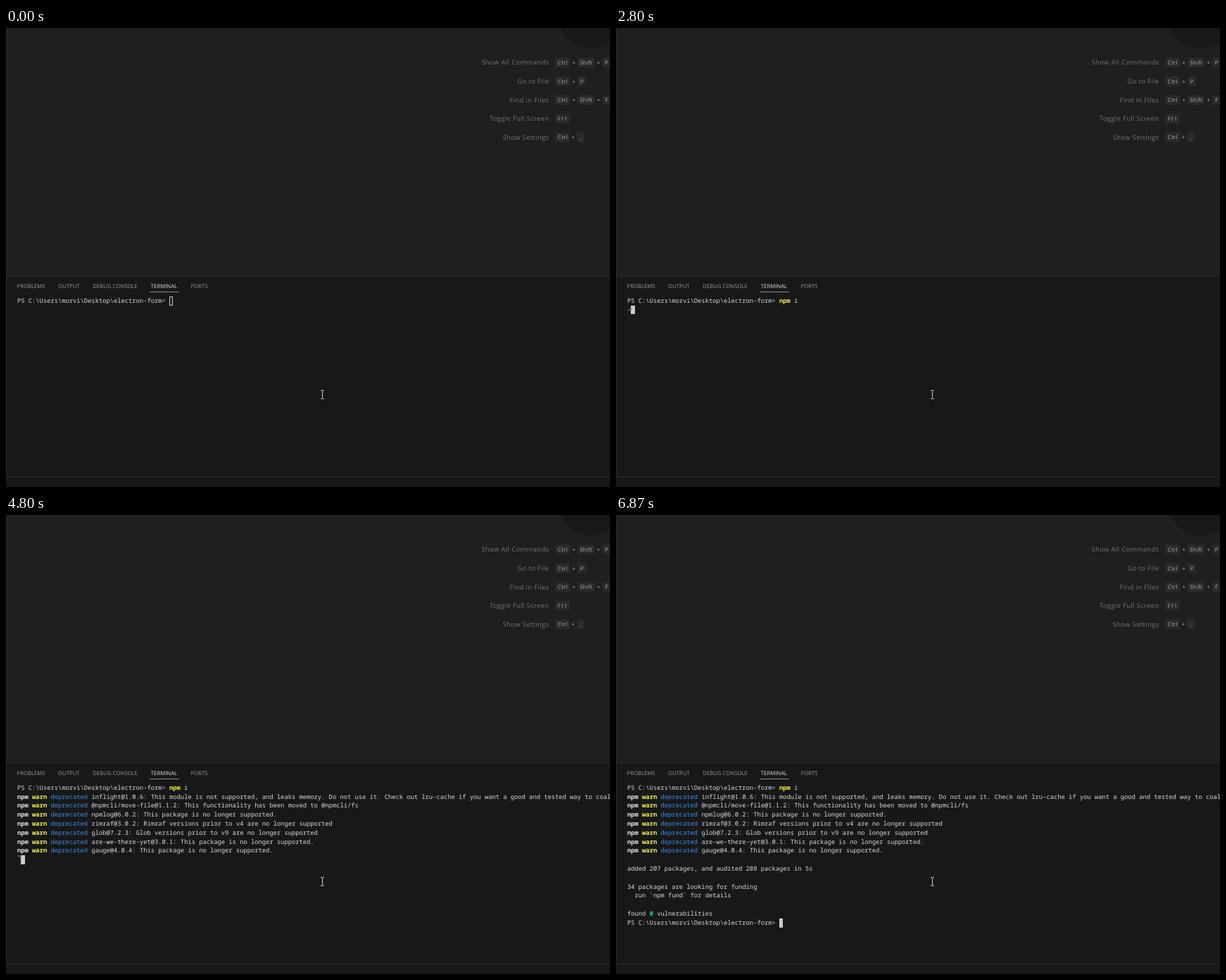
An HTML page for the animation above (8 s loop, 858 px wide and 653 px high).

```html
<!DOCTYPE html>
<html lang="en">
<head>
<meta charset="utf-8">
<title>Terminal install</title>
<style>
  html, body { margin: 0; width: 100%; height: 100%; overflow: hidden; background: #181818; }
  #stage { position: relative; width: 858px; height: 653px; overflow: hidden; text-rendering: geometricPrecision; }
  #chrome { position: absolute; inset: 0; font-family: "Open Sans", "Noto Sans", sans-serif; }
  .label { font-size: 9.4px; letter-spacing: .04em; fill: #737373; text-anchor: end; }
  .key { font-size: 7.8px; letter-spacing: .04em; fill: #b4b4b4; text-anchor: middle; }
  .tab { font-size: 7.75px; fill: #9d9d9d; }
  .tab.active { fill: #e4e0d8; }
  #term {
    --cw: 5.274px; --lh: 12.8px;
    position: absolute; left: 16px; top: 381.8px;
    font: 8.79px/12.8px "Noto Sans Mono", "DejaVu Sans Mono", monospace;
    color: #dadada; white-space: pre;
  }
  .row { position: absolute; left: 0; height: var(--lh); }
  b { color: #e5e5e5; }
  .warn { color: #f5f543; }
  .note { color: #3b8eea; }
  .ok { color: #23d18b; }
  #cursor, #spinner { position: absolute; height: var(--lh); font: 9.6px/12.8px "DejaVu Sans", sans-serif; }
  #cursor {
    width: var(--cw); box-sizing: border-box; overflow: hidden;
    background: #ccc; color: #181818; text-indent: calc(-1 * var(--cw));
  }
  #cursor.idle { background: none; border: 1px solid #ccc; }
</style>
</head>
<body>
<div id="stage">
  <svg id="chrome" width="858" height="653" viewBox="0 0 858 653">
    <rect width="858" height="353" fill="#1f1f1f"/>
    <circle cx="830" cy="-16" r="45" fill="#181818"/>
    <path d="M0 353.5H858M0 638.5H858M.5 0V638" stroke="#2b2b2b"/>
    <g id="hints"></g>
    <g id="tabs"></g>
    <path d="M204 375.5H246" stroke="#8c8a86"/>
    <path d="M447 515.5H449M450 515.5H452M447 527.5H449M450 527.5H452M449.5 516V527" stroke="#d0d0d0"/>
  </svg>
  <div id="term"></div>
</div>
<script>
const $ = id => document.getElementById(id);

// Shortcut hints: label, then keys as [text, left, width]
const ctrl = ['Ctrl', 780, 21], shift = ['Shift', 812, 24];
const hints = [
  ['Show All Commands', ctrl, shift, ['P', 847, 12]],
  ['Go to File', ctrl, ['P', 812, 12]],
  ['Find in Files', ctrl, shift, ['F', 847, 12]],
  ['Toggle Full Screen', ['F11', 780, 21]],
  ['Show Settings', ctrl, [',', 811, 11]]
];
$('hints').innerHTML = hints.map(([label, ...keys], i) => {
  const y = 49 + i * 26.6;
  const caps = keys.map(([text, x, w], k) =>
    `<rect x="${x}" y="${y - 7}" width="${w}" height="14" rx="2" fill="#2a2a2a"/>` +
    `<text class="key" x="${x + w / 2 + .2}" y="${y + 2.9}">${text}</text>` +
    (k ? `<text class="key" x="${x - 5.2}" y="${y + 2.9}">+</text>` : ''));
  return `<text class="label" x="771.4" y="${y + 3.4}">${label}</text>` + caps.join('');
}).join('');

const tabs = [['PROBLEMS', 15.5], ['OUTPUT', 74], ['DEBUG CONSOLE', 123.3], ['TERMINAL', 205.8], ['PORTS', 262.5]];
$('tabs').innerHTML = tabs.map(([name, x]) =>
  `<text class="tab${name === 'TERMINAL' ? ' active' : ''}" x="${x}" y="370.4">${name}</text>`).join('');

// Terminal contents
const prompt = 'PS C:\\Users\\morvi\\Desktop\\electron-form&gt; ';
const gone = 'This package is no longer supported.';
const warnings = [
  'inflight@1.0.6: This module is not supported, and leaks memory. Do not use it. Check out lru-cache if you want a good and tested way to coalesce',
  '@npmcli/move-file@1.1.2: This functionality has been moved to @npmcli/fs',
  'npmlog@6.0.2: ' + gone,
  'rimraf@3.0.2: Rimraf versions prior to v4 are no longer supported',
  'glob@7.2.3: Glob versions prior to v9 are no longer supported',
  'are-we-there-yet@3.0.1: ' + gone,
  'gauge@4.0.4: ' + gone
].map(text => `<b>npm</b> <b class="warn">warn</b> <span class="note">deprecated</span> ${text}`);
const summary = [
  '',
  'added 207 packages, and audited 208 packages in 5s',
  '',
  '34 packages are looking for funding',
  '  run `npm fund` for details',
  '',
  'found <b class="ok">0</b> vulnerabilities',
  prompt
];
const lines = [prompt + '<b class="warn" id="cmd"></b><span id="arg"></span>', ...warnings, ...summary];
$('term').innerHTML = lines.map((html, i) =>
  `<div class="row" style="top:${(i * 12.8).toFixed(1)}px">${html}</div>`).join('') +
  '<div id="spinner"></div><div id="cursor"></div>';
const rows = document.querySelectorAll('.row');

// The screen advances 15 times a second; all times below are in ticks.
const LOOP = 8000, TICK = 1000 / 15;
const keyTicks = [11, 15, 19, 21, 23];
const ENTER = 27, SPIN = 35, WARN = 44, LAST_WARN = 45, DONE = 103;
const dots = '⠋⠙⠹⠸⠼⠴⠦⠧⠇⠏';

function spinStep(n) {
  if (n < 42) return Math.floor(n / 2) - 16;
  if (n < 48) return n - 37;
  return 11 + Math.floor((n - 48) * 5 / 6);
}

function place(el, row, col) {
  el.style.top = `calc(${row} * var(--lh))`;
  el.style.left = `calc(${col} * var(--cw))`;
}

function render(n) {
  const typed = keyTicks.filter(k => n >= k).length;
  const text = 'npm i'.slice(0, typed);
  $('cmd').textContent = text.slice(0, 3);
  $('arg').textContent = text.slice(3);

  const last = n < WARN ? 0 : n < LAST_WARN ? 6 : n < DONE ? 7 : 15;
  rows.forEach((row, i) => row.style.visibility = i <= last ? 'visible' : 'hidden');

  const spinning = n >= SPIN && n < DONE;
  const glyph = spinning ? dots[spinStep(n) % 10] : '';
  const cursor = $('cursor');
  $('spinner').textContent = cursor.textContent = glyph;
  place($('spinner'), last + 1, 0);
  cursor.className = n < 2 ? 'idle' : '';

  if (n < ENTER) place(cursor, 0, 41 + typed);
  else if (n < DONE) place(cursor, last + 1, spinning ? 1 : 0);
  else place(cursor, 15, 41);
}

let shown = -1;
function loop() {
  const n = Math.floor((performance.now() % LOOP + 5) / TICK) % 120;
  if (n !== shown) render(shown = n);
  requestAnimationFrame(loop);
}
loop();
</script>
</body>
</html>
```
